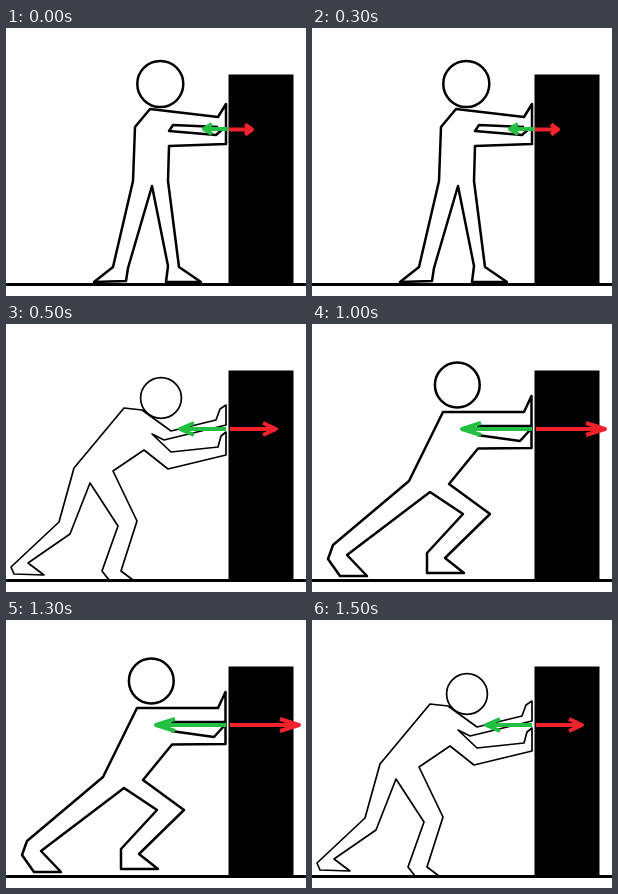
An HTML page for the animation above (2 s loop, 300 by 268 pixels).

```html
<!DOCTYPE html>
<html lang="en">
<head>
<meta charset="utf-8">
<title>Pushing a block</title>
<style>
  html, body { margin: 0; width: 100%; height: 100%; overflow: hidden; background: #fff; }
  svg { display: block; width: 100%; height: 100%; }
  .pose { fill: none; stroke: #000; stroke-width: 2.5; stroke-linejoin: round; visibility: hidden; }
  .arrow { stroke-width: 4; }
  .back { stroke: #22bf42; }
  .push { stroke: #f0222b; }
  .light { animation: light 2s step-end infinite; }
  .medium { stroke-width: 1.7; animation: medium 2s step-end infinite; }
  .hard { animation: hard 2s step-end infinite; }
  @keyframes light { 0% { visibility: visible; } 25%, 100% { visibility: hidden; } }
  @keyframes medium {
    0%, 50%, 100% { visibility: hidden; }
    25%, 75% { visibility: visible; }
  }
  @keyframes hard { 0%, 75%, 100% { visibility: hidden; } 50% { visibility: visible; } }
</style>
</head>
<body>
<svg viewBox="0 0 300 268">
  <path d="M0 256.500H300" stroke="#000" stroke-width="3"/>
  <rect x="222.5" y="46.5" width="65" height="210"/>

  <g class="pose light">
    <circle cx="154.3" cy="56" r="23"/>
    <path d="M144 81L212 89L220 76V116L163 118L162 153L173 239L195 254H160L162 238L146 158L122 240L120 253L88 254L107 239L127 153L129 99Z"/>
    <path d="M212 99L167 97L163 103L210 107L218 100"/>
    <g class="arrow">
      <path class="back" d="M222 101H199M206 96L198 101L206 106"/>
      <path class="push" d="M223 101.500H245M239 96.500L246 101.500L239 106.500"/>
    </g>
  </g>

  <g class="pose medium">
    <circle cx="155" cy="74" r="20.4"/>
    <path d="M136 86L118 84L68 144L53 198L5 243L8 250L38 251L22 239L64 210L84 159L112 202L96 247L103 256H127L115 247L131 197L107 147L138 126L162 145L220 131V108L215 112L212 123L165 128L146 110L158 116L220 101V81L214 85L210 96L165 107Z"/>
    <g class="arrow">
      <path class="back" d="M220 105H175M188 99L174 105L188 111"/>
      <path class="push" d="M224 105H269M257 99L270 105L257 111"/>
    </g>
  </g>

  <g class="pose hard">
    <circle cx="145.3" cy="61" r="22.4"/>
    <path d="M131 88H212L219.500 72V124L166 124.500L137 160L178 190L133 234L152 249H115V229L151 190L118 168L35 231L55 252H28L16 235L21 221L97 157Z"/>
    <path d="M219 102H165M165 111L208 117L218 106"/>
    <g class="arrow">
      <path class="back" d="M220 105H151M169 99L150 105L169 111"/>
      <path class="push" d="M224 105H292M274 99L293 105L274 111"/>
    </g>
  </g>
</svg>
</body>
</html>
```
